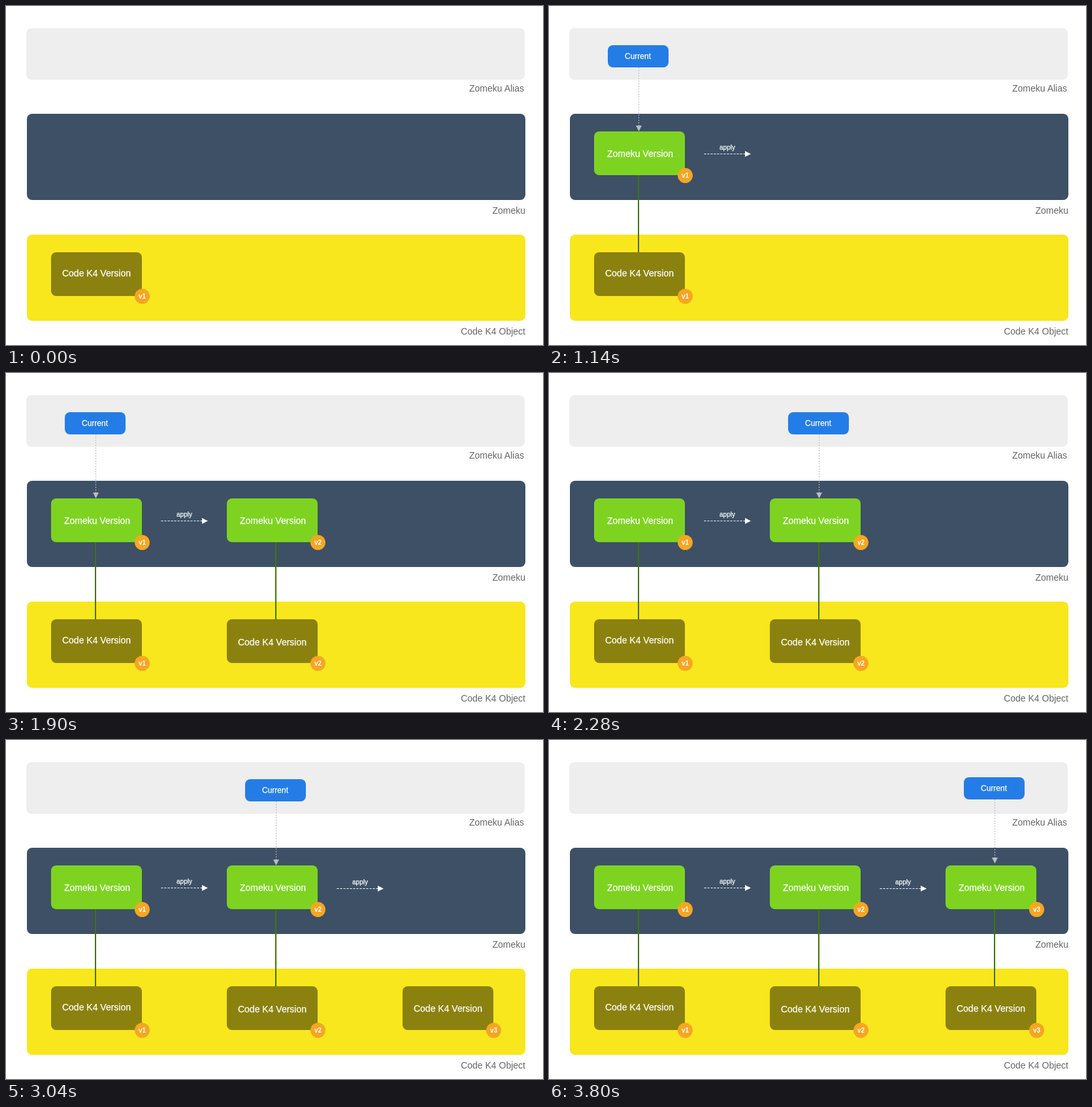
Animation of 822x519 px, one loop 4.18 s. Source, as an HTML page:

```html
<!DOCTYPE html>
<html lang="en">
<head>
<meta charset="utf-8">
<title>Versions and aliases</title>
<style>
  @property --step { syntax: "<integer>"; inherits: true; initial-value: 0; }
  @keyframes advance { from { --step: 0; } to { --step: 11; } }

  html, body { margin: 0; width: 100%; height: 100%; overflow: hidden; background: #fff; }
  svg {
    display: block; width: 822px; height: 519px;
    font: 14px "Liberation Sans", Arial, sans-serif;
    animation: advance 4180ms steps(11) infinite;
  }

  /* each part appears at its own step (--at) and stays until the loop ends */
  .part { opacity: clamp(0, var(--step) - var(--at) + 1, 1); }
  .alias {
    transform: translate(
      calc(clamp(0, var(--step) - 5, 1) * 276px + clamp(0, var(--step) - 9, 1) * 269px),
      calc(clamp(0, var(--step) - 9, 1) * -3px));
  }

  .label { fill: #666; text-anchor: end; }
  .white { fill: #fff; stroke: #fff; stroke-width: .25px; }
  .mid { text-anchor: middle; }
  .badge { fill: #fff; font-size: 10px; font-weight: bold; text-anchor: middle; }
  .link { stroke: #417505; stroke-width: 2px; }
</style>
</head>
<body>
<svg viewBox="0 0 822 519">
  <defs>
    <rect id="box" width="139" height="67" rx="8"/>
    <circle id="dot" cx="139.5" cy="67.5" r="11.5" fill="#f5a623"/>
    <g id="code">
      <use href="#box" fill="#8b810f"/>
      <use href="#dot"/>
    </g>
    <g id="func">
      <use href="#box" fill="#7ed321"/>
      <text class="white mid" x="70.5" y="39">Zomeku Version</text>
      <use href="#dot"/>
    </g>
    <g id="apply">
      <text class="white mid" x="36" y="-6.5" font-size="10">apply</text>
      <path d="M.5 0H63" stroke="#fff" stroke-dasharray="3 2"/>
      <path d="M63-4.5L72 0L63 4.5Z" fill="#fff"/>
    </g>
  </defs>

  <rect x="31" y="34" width="763" height="79" rx="8" fill="#eee"/>
  <rect x="32" y="165" width="763" height="132" rx="8" fill="#3d5066"/>
  <rect x="32" y="350" width="763" height="132" rx="8" fill="#f8e71c"/>
  <text class="label" x="793" y="131">Zomeku Alias</text>
  <text class="label" x="795" y="318">Zomeku</text>
  <text class="label" x="795" y="503">Code K4 Object</text>

  <g>
    <use href="#code" x="69" y="377"/>
    <text class="white mid" x="138.5" y="414">Code K4 Version</text>
    <text class="badge" x="208.5" y="448">v1</text>
  </g>
  <g class="part" style="--at:1">
    <path class="link" d="M137 259V377"/>
    <use href="#func" x="69" y="192"/>
    <text class="badge" x="208.5" y="263">v1</text>
  </g>
  <use class="part" style="--at:3" href="#apply" x="237" y="226.5"/>

  <g class="part" style="--at:4">
    <use href="#code" x="338" y="377"/>
    <text class="white mid" x="407.5" y="417">Code K4 Version</text>
    <text class="badge" x="477.5" y="448">v2</text>
  </g>
  <g class="part" style="--at:5">
    <path class="link" d="M413 259V377"/>
    <use href="#func" x="338" y="192"/>
    <text class="badge" x="477.5" y="263">v2</text>
  </g>
  <use class="part" style="--at:7" href="#apply" x="506" y="227.5"/>

  <g class="part" style="--at:8">
    <use href="#code" x="607" y="377"/>
    <text class="white mid" x="676.5" y="416">Code K4 Version</text>
    <text class="badge" x="746.5" y="448">v3</text>
  </g>
  <g class="part" style="--at:9">
    <path class="link" d="M682 259V377"/>
    <use href="#func" x="607" y="192"/>
    <text class="badge" x="746.5" y="263">v3</text>
  </g>

  <g class="part alias" style="--at:2">
    <path d="M137.5 94V183" stroke="#bbb" stroke-dasharray="2 2"/>
    <path d="M133 183H142L137.5 192Z" fill="#bbb"/>
    <rect x="90" y="60" width="93" height="34" rx="8" fill="#247de6"/>
    <text class="white mid" x="136" y="81" font-size="12">Current</text>
  </g>
</svg>
</body>
</html>
```
